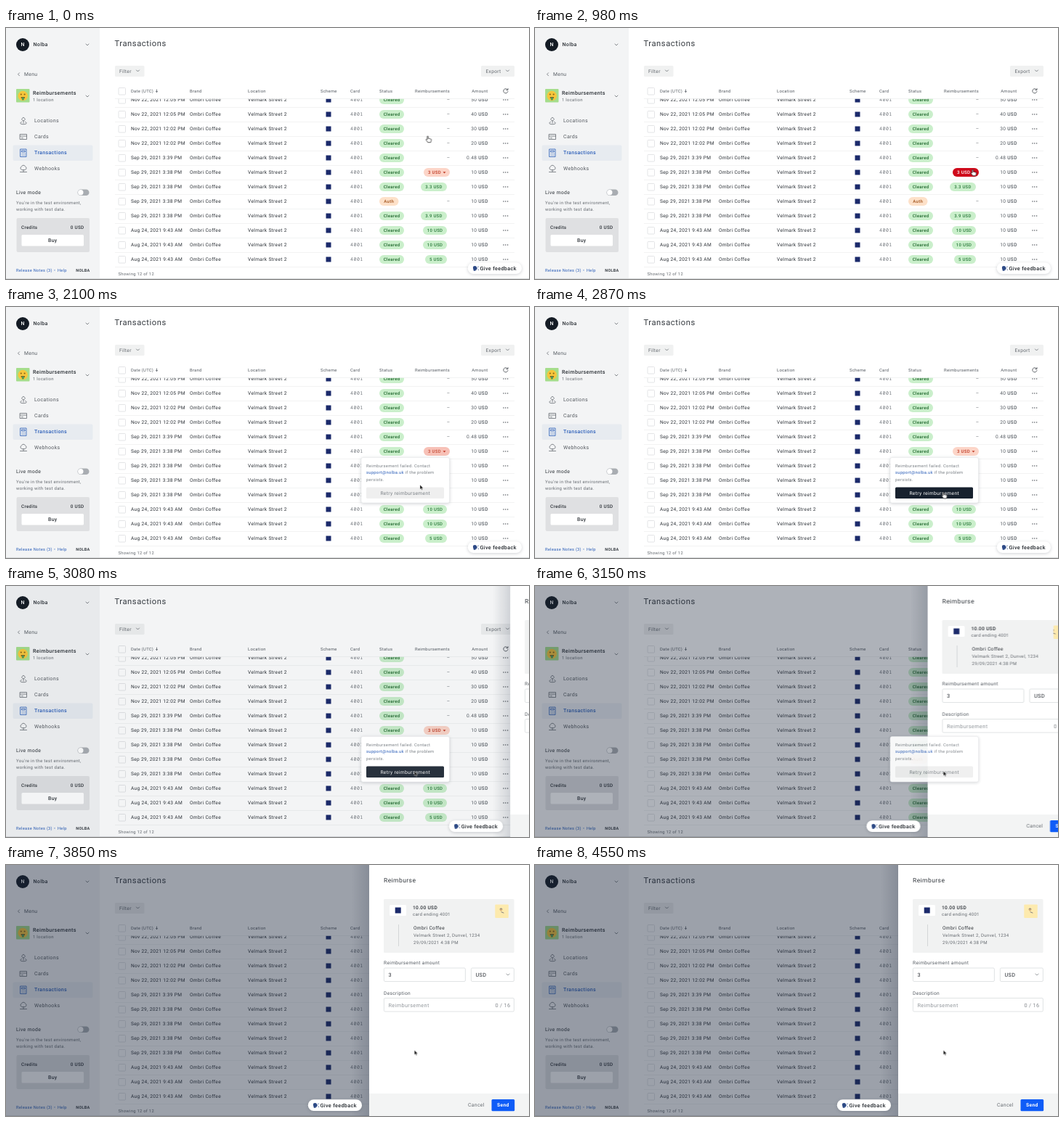
Animation, 720 px wide and 346 px high, one loop 4.62 s. Source, as an HTML page:

```html
<!DOCTYPE html>
<html lang="en">
<head>
<meta charset="utf-8">
<title>Transactions</title>
<style>
html, body { margin: 0; width: 100%; height: 100%; overflow: hidden; background: #fff; }
svg { display: block; width: 720px; height: 346px; font-family: Roboto, Arial, sans-serif; text-rendering: geometricPrecision; }
text { letter-spacing: .05em; white-space: pre; }
.m { font-weight: 500; }
.b { font-weight: 700; }
.end { text-anchor: end; }
.mid { text-anchor: middle; }
.mono { font-family: "Noto Sans Mono", "DejaVu Sans Mono", monospace; letter-spacing: .5px; }
.line { fill: none; stroke-width: .8; stroke-linecap: round; stroke-linejoin: round; }
.shadow { filter: drop-shadow(0 1px 2px rgba(20, 30, 45, .2)); }

.veil, .drawer, .feedback, .hot, .pop, .press, .cursor, .hand, .arrow, .badge {
  animation: 4620ms linear infinite;
}
.veil { animation-name: veil; }
.drawer { animation-name: drawer; }
.feedback { animation-name: feedback; }
.hot { animation-name: hot; }
.pop { animation-name: pop; }
.press { animation-name: press; }
.cursor { animation-name: cursor; }
.hand { animation-name: hand; animation-timing-function: step-end; }
.arrow { animation-name: arrow; animation-timing-function: step-end; }
.badge { animation-name: badge; }

@keyframes veil {
  0% { opacity: 0; }
  66.58% { opacity: 0; animation-timing-function: cubic-bezier(0, 0, .2, 1); }
  70.04%, 100% { opacity: 1; }
}
@keyframes drawer {
  0% { transform: translateX(250px); }
  66.57% { transform: translateX(250px); }
  66.58% { transform: translateX(220px); animation-timing-function: cubic-bezier(0, 0, .2, 1); }
  70.04%, 100% { transform: translateX(0); }
}
@keyframes feedback {
  0% { transform: translateX(0); }
  66.58% { transform: translateX(0); animation-timing-function: cubic-bezier(0, 0, .2, 1); }
  70.04%, 100% { transform: translateX(-220px); }
}
@keyframes hot {
  0%, 14.5% { opacity: 0; }
  17% { opacity: 1; }
  42.21% { opacity: 1; animation-timing-function: ease-out; }
  46.54%, 100% { opacity: 0; }
}
@keyframes pop {
  0%, 30.3% { opacity: 0; }
  32.47%, 68.07% { opacity: 1; }
  69.48%, 100% { opacity: 0; }
}
@keyframes press {
  0%, 46.97% { opacity: 0; }
  50%, 66.58% { opacity: 1; }
  67.97%, 100% { opacity: 0; }
}
@keyframes cursor {
  0% { transform: translate(580.5px, 149px); animation-timing-function: ease-in-out; }
  17.32% { transform: translate(602.5px, 195px); }
  40.04% { transform: translate(602.5px, 195px); animation-timing-function: ease-in-out; }
  45.45% { transform: translate(570px, 245px); animation-timing-function: ease-out; }
  50.87%, 100% { transform: translate(562.3px, 255.3px); }
}
@keyframes hand {
  0% { opacity: 1; }
  42.8% { opacity: 0; }
  46.97% { opacity: 1; }
  66.58%, 100% { opacity: 0; }
}
@keyframes arrow {
  0% { opacity: 0; }
  42.8% { opacity: 1; }
  46.97% { opacity: 0; }
  66.58%, 100% { opacity: 1; }
}
@keyframes badge {
  0%, 71.43% { transform: translateX(-9.5px); animation-timing-function: ease-out; }
  80.09%, 100% { transform: translateX(0); }
}
</style>
</head>
<body>
<svg id="stage" viewBox="0 0 720 346"></svg>
<script>
const BRAND = 'Nolba', SHOP = 'Ombri Coffee', STREET = 'Velmark Street 2';
const INK = '#2b3036', GREY = '#666b71', BLUE = '#2a5db8', NAVY = '#1b2a6b';

// y is the vertical centre of the capitals
const text = (x, y, s, size = 6.6, fill = INK, cls = '') =>
  `<text x="${x}" y="${y + size * .355}" font-size="${size}" fill="${fill}" class="${cls}">${s}</text>`;
const box = (x, y, w, h, fill, r = 0, more = '') =>
  `<rect x="${x}" y="${y}" width="${w}" height="${h}" rx="${r}" fill="${fill}" ${more}/>`;
const dot = (x, y, r, fill) => `<circle cx="${x}" cy="${y}" r="${r}" fill="${fill}"/>`;
const line = (d, color = GREY) => `<path class="line" d="${d}" stroke="${color}"/>`;
const chevron = (x, y, color = GREY) => line(`M${x - 2} ${y - 1}l2 2 2-2`, color);
const field = (x, y, w, h) => box(x, y, w, h, '#fff', 1.5, 'stroke="#d9dcde" stroke-width=".8"');
const check = y => box(155, y - 4.5, 9.5, 9.5, '#fff', 1, 'stroke="#dcdee0" stroke-width=".8"');
const pill = (x, y, w, s, bg, fg) =>
  box(x, y - 6, w, 12, bg, 6) + text(x + w / 2, y, s, 6, fg, 'm mid');
const scheme = (x, y, s) => box(x - s / 2, y - s / 2, s, s, NAVY);

function sidebar() {
  const items = [
    ['Locations', 128, 'M24 123.5a2.2 2.2 0 1 1-.01 0M24 128v3M21.5 129.5c-2.5.5-3 3.2 2.5 3.2s5-2.7 2.5-3.2'],
    ['Cards', 150, 'M19.5 146.5h9v7h-9zM19.5 149h9M21.3 151.7h2'],
    ['Transactions', 172, 'M20 167h8v10.5h-8zM21.8 169h4.4v2h-4.4zM22 173.5h.1M24 173.5h.1M26 173.5h.1M22 175.5h.1M24 175.5h.1M26 175.5h.1'],
    ['Webhooks', 194, 'M21.5 195.5a2.5 2.5 0 0 1 0-4.6a2.7 2.7 0 0 1 5 0a2.5 2.5 0 0 1 0 4.6zM24 195.5v3M19.5 198.5h9']
  ];
  return box(0, 0, 129, 346, '#f3f4f5') +
    dot(23, 23, 9, '#141b24') + text(23.2, 23, BRAND[0], 7, '#fff', 'm mid') +
    text(37.5, 23, BRAND, 7, INK, 'm') + chevron(112, 23) +
    line('M18.5 61.8l-2 2 2 2') + text(25, 64, 'Menu', 6.8, '#555b62') +
    box(14, 84, 18.5, 18.5, '#a5dd8b', 1) + dot(23.2, 93.5, 6.8, '#f6c63c') +
    dot(20.8, 91.5, 1.1, '#8a6417') + dot(25.6, 91.5, 1.1, '#8a6417') +
    box(20.5, 95, 5.6, 2, '#8a5a1c', 1) + box(21.8, 95.5, 3, 4, '#4d9b57', 1) +
    text(37, 89, 'Reimbursements', 7.2, INK, 'm') + text(37, 98.5, '1 location', 5.9, GREY) + chevron(112, 94) +
    box(9.5, 161.5, 110, 21.5, '#e7ebf0', 2) +
    items.map(([name, y, icon]) => {
      const on = name == 'Transactions';
      return line(icon, on ? BLUE : GREY) + text(39, y, name, 7, on ? BLUE : '#565b61', on ? 'm' : '');
    }).join('') +
    text(14, 227, 'Live mode', 6.8) +
    box(98.5, 222.5, 16, 8.5, '#a9adb2', 4.25) + dot(102.8, 226.75, 3.7, '#fff') +
    text(14, 240.5, "You're in the test environment,", 6, GREY) + text(14, 250, 'working with test data.', 6, GREY) +
    box(14.5, 262, 100.5, 47, '#dfe0e2', 2) + text(21, 275, 'Credits', 6.3, INK, 'm') +
    text(107.5, 275, '0 USD', 6.3, INK, 'm end') +
    box(21.5, 285, 85.5, 15.5, '#fff', 1.5) + text(64.3, 293, 'Buy', 6.8, INK, 'm mid') +
    text(14, 334, 'Release Notes (3)', 5.7, BLUE) + text(66, 334, '•', 5.7, BLUE) +
    text(71, 334, 'Help', 5.7, BLUE) + text(115.5, 334, BRAND.toUpperCase(), 5.5, '#3a3f45', 'b end');
}

function row([date, paid, amount, status = 'Cleared'], i) {
  const y = 99 + i * 20;
  const w = 27 + paid.length * 3;
  const money = paid == '–' ? text(611.5, y, '–', 6.6, GREY, 'end')
    : paid == '3' ? box(575, y - 6, 36, 12, '#fcd5c8', 6) + text(581, y, '3 USD', 6, '#bf3a24', 'm') +
        `<path d="M601.5 ${y - .8}h4l-2 2.2z" fill="#bf3a24"/>` +
        `<g class="hot">${box(575, y - 6, 36, 12, '#cf0a1b', 6)}${text(581, y, '3 USD', 6.2, '#fff', 'm')}</g>`
    : pill(607 - w, y, w, paid + ' USD', '#caefcb', '#2b7a3c');
  return check(y) + text(172, y, date) + text(253, y, SHOP) + text(333, y, STREET) + scheme(444, y, 7) +
    text(474, y, '4001', 6.6, '#74797f', 'mono') +
    (status == 'Auth' ? pill(514, y, 26.5, status, '#fde1c9', '#a2531d') : pill(514, y, 34, status, '#caefcb', '#22692f')) +
    money + text(663.8, y, `${amount} <tspan class="m">USD</tspan>`, 6.6, '#555b62', 'end') +
    [685, 687.8, 690.6].map(x => dot(x, y, .75, '#4c5157')).join('') +
    box(150, y + 10, 550, .6, '#e9ebec');
}

function table() {
  const nov = 'Nov 22, 2021 ', sep = 'Sep 29, 2021 3:3', aug = 'Aug 24, 2021 9:43 AM';
  const rows = [
    [nov + '12:05 PM', '–', 50], [nov + '12:05 PM', '–', 40], [nov + '12:02 PM', '–', 30],
    [nov + '12:02 PM', '–', 20], [sep + '9 PM', '–', '0.48'], [sep + '8 PM', '3', 10],
    [sep + '8 PM', '3.3', 10], [sep + '8 PM', '–', 10, 'Auth'], [sep + '8 PM', '3.9', 10],
    [aug, '10', 10], [aug, '10', 10], [aug, '5', 10]
  ];
  const heads = [[172, 'Date (UTC)'], [253, 'Brand'], [333, 'Location'], [433, 'Scheme'], [474, 'Card'],
    [514, 'Status'], [611, 'Reimbursements', 'end'], [663.5, 'Amount', 'end']];
  return text(149.5, 21, 'Transactions', 11.2, '#33383e') +
    box(150, 52, 40.5, 15, '#f0f1f1', 1.5) + text(156, 59.3, 'Filter', 6.6, '#62676d') + chevron(181.5, 59) +
    box(654, 52, 46, 15, '#f0f1f1', 1.5) + text(660.5, 59.3, 'Export', 6.6, '#62676d') + chevron(690.5, 59) +
    `<g clip-path="url(#body)">${rows.map(row).join('')}</g>` +
    box(150, 97, 550, .6, '#e9ebec') + check(87) +
    heads.map(([x, s, cls]) => text(x, 87, s, 5.8, '#555b62', cls)).join('') +
    line('M207.5 85v3.6m-1.2-1.2l1.2 1.2 1.2-1.2', '#555b62') +
    line('M690.5 85a3.1 3.1 0 1 0 .5 2.5M691 83.5v2h-2', '#3d4248') +
    text(154.5, 338.5, 'Showing 12 of 12', 5.8, GREY);
}

function drawer() {
  return box(476, 0, 24, 346, 'url(#edge)') + box(500, 0, 221, 346, '#fff') +
    text(520, 20.5, 'Reimburse', 8.5, '#33383e') +
    box(520, 47, 179.5, 74, '#f1f2f2', 1.5) + box(528, 55, 23, 15, '#fff', 1.5) + scheme(539.7, 62.5, 8) +
    text(560, 58.3, '10.00 USD', 6.6, INK, 'm') + text(560, 68.3, 'card ending 4001', 6.1, GREY) +
    box(540, 82, 1, 30, '#d3d6d8') + text(561, 86.7, SHOP) +
    text(561, 97, STREET + ', Dunvel, 1234', 6.1, GREY) + text(561, 107, '29/09/2021 4:38 PM', 6.1, GREY) +
    box(673.3, 54.5, 18.5, 18.5, '#fdeaae', 1) +
    `<g clip-path="url(#tile)"><g class="badge">${dot(681.5, 61.8, 1.7, '#d9b27c')}${
      line('M680 60.8c.4-1.5 2.6-1.5 3 0M682 64.8l3 1.2', '#5d6172')}</g></g>` +
    text(520, 135, 'Reimbursement amount', 6.6, '#555b62') +
    field(520.4, 142, 112, 18.5) + text(526.5, 151.5, '3', 7.3) +
    field(640.4, 142, 59, 18.5) + text(646.5, 151.5, 'USD', 7.3) + chevron(691, 151, '#85898e') +
    text(520, 176.5, 'Description', 6.6, '#555b62') + field(520.4, 183.5, 179, 18.5) +
    text(526.5, 193, 'Reimbursement', 7.3, '#92979c') + text(694.5, 193, '0 / 16', 7.3, '#85898e', 'end') +
    box(500, 315, 221, 31, '#f3f4f4') + text(636, 331, 'Cancel', 6.8, GREY) +
    box(668.5, 323, 31.7, 16.2, '#0f5cf7', 1.5) + text(684.3, 331, 'Send', 6.7, '#fff', 'b mid');
}

function popover() {
  return box(489, 207.5, 121.5, 62.5, '#fff', 2.5, 'class="shadow" stroke="#e6e8e9" stroke-width=".6"') +
    text(496, 218.5, 'Reimbursement failed. Contact', 5.8, '#7b8086') +
    text(496, 228, `<tspan fill="${BLUE}">support@${BRAND.toLowerCase()}.uk</tspan> if the problem`, 5.8, '#7b8086') +
    text(496, 237.5, 'persists.', 5.8, '#7b8086') +
    box(496, 248.5, 107, 15.5, '#efefef', 1.5) + text(549.7, 256.3, 'Retry reimbursement', 6.7, '#7b8086', 'mid') +
    `<g class="press">${box(496, 248.5, 107, 15.5, '#17212e', 1.5)}${
      text(549.7, 256.3, 'Retry reimbursement', 6.7, '#fff', 'mid')}</g>`;
}

const feedback = box(635.8, 323.3, 74.2, 15.7, '#fff', 7.85, 'class="shadow"') +
  '<path d="M643.5 328.5c2.5-1.5 4.6 0 4.7 1.8l.8 1.3-1 .4v1.5h-1.5v1.3h-2.7c0-2-1.8-4-.3-6.3z" fill="#2d4a86"/>' +
  line('M649.5 329.5l.8-.5M649.8 333l.8.5', '#2d4a86') +
  text(652.5, 331, 'Give feedback', 7.2, '#20252b', 'm');

const hand = '<path class="hand" d="M-.8.8c0-1.2 1.6-1.2 1.6 0v2.7c.5-.6 1.3-.4 1.5.2.5-.4 1.2-.2 1.4.4.7-.3 1.3.1 1.3.8 0 1.8-.4 2.3-.9 3.8h-4c-.6-1.2-1.7-2.3-2.3-3.5-.3-.8.7-1.3 1.4-.3z" fill="#fff" stroke="#111" stroke-width=".7" stroke-linejoin="round"/>';
const arrow = '<path class="arrow" d="M0 0v6.3l1.5-1.3 1 2.2 1-.45-1-2.1h2z" fill="#111" stroke="#fff" stroke-width=".4"/>';

document.getElementById('stage').innerHTML =
  `<defs><clipPath id="body"><rect x="140" y="97.5" width="570" height="240"/></clipPath>
   <clipPath id="tile"><rect x="673.3" y="54.5" width="18.5" height="18.5"/></clipPath>
   <linearGradient id="edge"><stop stop-color="#1b263b" stop-opacity="0"/>
   <stop offset="1" stop-color="#1b263b" stop-opacity=".16"/></linearGradient></defs>` +
  box(0, 0, 720, 346, '#fff') + sidebar() + table() + box(0, 345, 720, 1, '#d9dbdd') +
  `<rect class="veil" width="720" height="346" fill="rgba(27,38,59,.43)"/>
   <g class="drawer">${drawer()}</g>
   <g class="feedback">${feedback}</g>
   <g class="pop">${popover()}</g>
   <g class="cursor">${hand}${arrow}</g>`;
</script>
</body>
</html>
```
